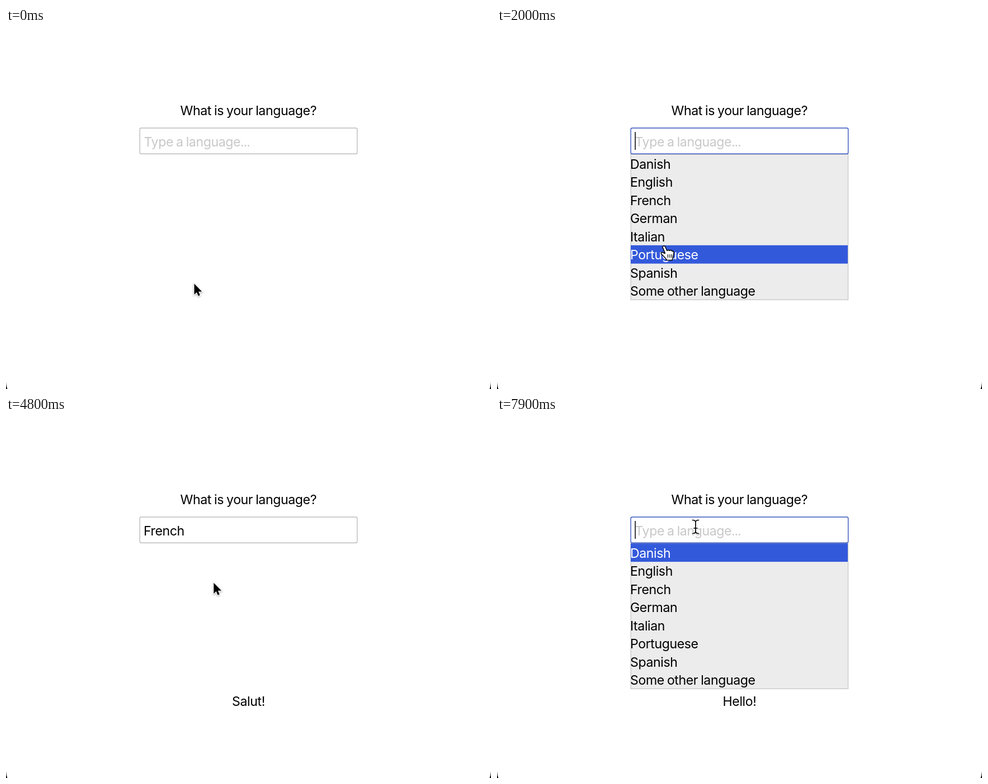
Recreate the animation shown at these times as an HTML page. Size 867 by 646 pixels, loop 8 s.

```html
<!DOCTYPE html>
<html lang="en">
<head>
<meta charset="utf-8">
<title>Language picker</title>
<style>
  html, body { margin: 0; width: 100%; height: 100%; overflow: hidden; background: #fff; }
  svg { display: block; }
  text {
    font: 400 23.2px Inter, "Open Sans", sans-serif;
    font-optical-sizing: none;
    letter-spacing: -0.45px;
    word-spacing: -1px;
  }
  .mid { text-anchor: middle; }
  #arrow { filter: drop-shadow(0 1.5px 1.5px rgba(0, 0, 0, .35)); }
</style>
</head>
<body>
<svg width="867" height="646" viewBox="0 0 867 646">
  <path d="M0 634Q.4 641 2.5 646H0ZM867 634Q866.6 641 864.5 646H867Z"/>
  <text class="mid" x="433.3" y="155.5">What is your language?</text>
  <text class="mid" id="greeting" x="433.5" y="516.5"></text>
  <g id="list">
    <rect id="panel" x="239.2" y="226" width="388.4" fill="#ececec" stroke="#c4c4c4" stroke-width="1.2"/>
    <rect id="bar" x="239" width="388" height="32.8" fill="#3359db"/>
    <g id="rows"></g>
  </g>
  <rect id="field" x="239.2" y="179" width="388.6" height="46.3" rx="2.5" fill="#fff" stroke-width="1.4"/>
  <text id="hint" x="246.5" y="211.5" fill="#c8c8c8">Type a language<tspan letter-spacing="-1.2">...</tspan></text>
  <text id="value" x="246" y="211.5"></text>
  <rect id="caret" y="186" width="1.5" height="32"/>
  <g id="pointer">
    <path id="arrow" d="M0 0V19.5L4.4 15.4L7.2 22L10.4 20.6L7.6 14.2H13.8Z" stroke="#fff" stroke-width="2.4" paint-order="stroke"/>
    <g id="hand" fill="#fff" stroke="#000" stroke-width="1.5" stroke-linejoin="round">
      <path d="M-2 1C-2-1 1-2 2.5 0L6 7.5C7 6 10 6 10.5 7.5C12 6 15 6.5 15 8.5C17 7.5 18.5 9 18 11C18 15 17 18 16 22L15 24.5H5.5C4 21 1 19-1.5 16C-5 13.5-5.5 11-3.5 10.5C-1.5 10 0 11 1.5 12.5L2.5 12Z"/>
      <path d="M7.5 14V20M11 14V20M14.3 14V20" stroke-width="1.2"/>
    </g>
    <g id="beam" fill="none">
      <path id="stem" d="M-5.5-12Q0-12 0-8Q0-12 5.5-12M0-9V9M-5.5 12Q0 12 0 8Q0 12 5.5 12M-3 2.5H3" stroke="#fff" stroke-width="3.4"/>
      <use href="#stem" id="ink"/>
    </g>
  </g>
</svg>
<script>
const LOOP = 8000, STEP = 100, TOP = 226.5, ROW = 32.5;
const languages = ['Danish', 'English', 'French', 'German', 'Italian',
  'Portuguese', 'Spanish', 'Some other language'];

// time, x, y of the pointer's hot spot
const path = [
  [0, 336.5, 457.5], [100, 342, 205], [200, 346, 133], [300, 346, 133], [500, 330, 200],
  [1100, 330, 200], [1300, 327, 222], [1500, 324, 242.5], [2000, 298, 391],
  [2400, 168, 412], [2500, 166, 414], [2800, 285, 362], [2900, 308, 332],
  [3000, 312, 314], [3100, 313.5, 310], [3400, 313.5, 310], [4200, 392, 480],
  [4500, 408, 522], [4600, 400, 480], [4900, 357, 205], [5000, 355, 198],
  [6000, 355, 198], [6100, 355, 197], [7800, 355, 197], [7900, 355, 196.5]
];

const states = [
  { t: 0, text: '', greet: '' },
  { t: 900, text: '', greet: '', open: true, pick: 0 },
  { t: 3400, text: 'French', greet: 'Salut!' },
  { t: 5000, text: '', greet: 'Salut!', open: true, pick: 2 },
  { t: 6100, text: 'E', greet: 'Salut!', open: true, pick: 0 },
  { t: 6200, text: 'En', greet: 'Salut!', open: true, pick: 0 },
  { t: 6300, text: 'Eng', greet: 'Salut!', open: true, pick: 0 },
  { t: 6700, text: 'English', greet: 'Hello!' },
  { t: 7900, text: '', greet: 'Hello!', open: true, pick: 0 }
];

const $ = id => document.getElementById(id);
const show = (id, on) => $(id).style.display = on ? '' : 'none';
const inside = ([x, y], l, t, r, b) => x >= l && x < r && y >= t && y < b;

$('stem').setAttribute('stroke-linecap', 'round');
$('beam').lastElementChild.replaceWith(Object.assign($('stem').cloneNode(), { id: 'ink' }));
$('ink').setAttribute('stroke', '#000');
$('ink').setAttribute('stroke-width', 1.7);

function pointerAt(t) {
  const i = path.findIndex(p => p[0] > t);
  if (i < 0) return path[path.length - 1].slice(1);
  const [a, b] = [path[i - 1], path[i]];
  const k = (t - a[0]) / (b[0] - a[0]);
  return [1, 2].map(n => a[n] + (b[n] - a[n]) * k);
}

const inList = (p, count) => inside(p, 239, TOP, 628, TOP + count * ROW);

// The last row the pointer touched since the list opened
function pickedRow(state, t, count) {
  let row = state.pick;
  for (let s = state.t; s <= t; s += STEP) {
    const p = pointerAt(s);
    if (inList(p, count)) row = Math.floor((p[1] - TOP) / ROW);
  }
  return row;
}

function drawList(items, picked) {
  $('panel').setAttribute('height', items.length * ROW + 0.3);
  $('bar').setAttribute('y', TOP + picked * ROW - 0.2);
  $('rows').innerHTML = items.map((name, i) =>
    `<text x="238" y="${TOP + i * ROW + 25}" fill="${i === picked ? '#fff' : '#000'}">${name}</text>`
  ).join('');
}

function draw(t) {
  const state = states.findLast(s => s.t <= t);
  const { text, greet, open } = state;
  const p = pointerAt(t);
  const items = languages.filter(name => !open || name.startsWith(text));
  const inField = inside(p, 239, 178, 629, 226);

  $('greeting').textContent = greet;
  $('value').textContent = text;
  show('hint', !text);
  show('list', open);
  if (open) drawList(items, pickedRow(state, t, items.length));
  $('field').setAttribute('stroke', open ? '#3957bd' : inField ? '#111' : '#bdbdbd');

  const blinkOn = t >= 5000 || Math.floor((t - 900) / 500) % 2 === 0;
  show('caret', open && blinkOn);
  $('caret').setAttribute('x', 246.4 + (text ? $('value').getComputedTextLength() : 0));

  const overText = inside(p, 312, 131, 555, 163) || inside(p, 404, 494, 463, 522);
  const kind = inField || overText ? 'beam' : open && inList(p, items.length) ? 'hand' : 'arrow';
  for (const id of ['arrow', 'hand', 'beam']) show(id, id === kind);
  $('pointer').setAttribute('transform', `translate(${p})`);
}

const start = performance.now();
let last = -1;
function tick() {
  const t = Math.floor((performance.now() - start) % LOOP / STEP) * STEP;
  if (t !== last) draw(last = t);
  requestAnimationFrame(tick);
}
tick();
</script>
</body>
</html>
```
